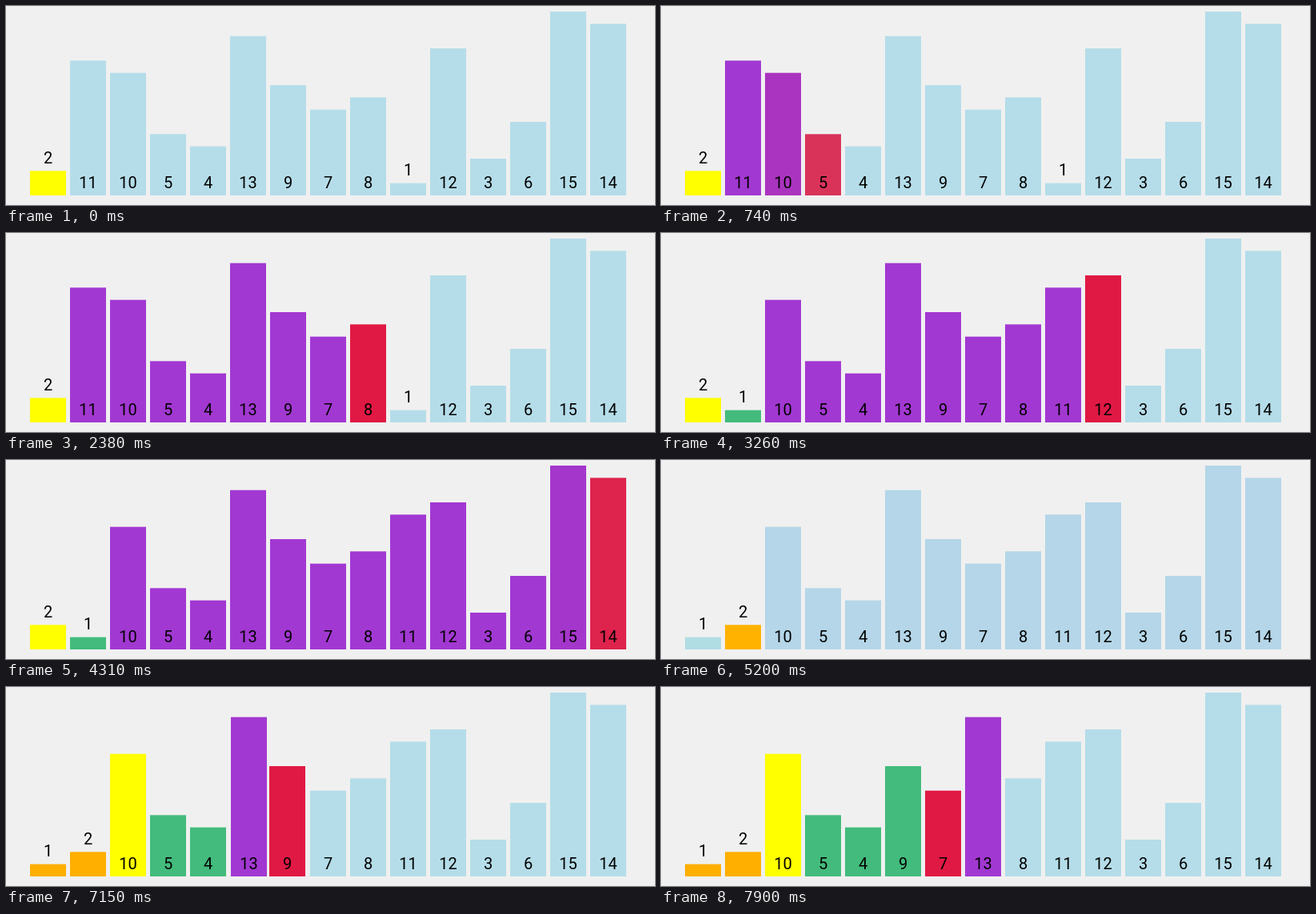
An HTML page that plays this animation: 811 by 249 pixels, repeating every 8 s.

```html
<!DOCTYPE html>
<html lang="en">
<head>
<meta charset="utf-8">
<title>Quick sort</title>
<style>
  html, body { margin: 0; width: 100%; height: 100%; overflow: hidden; background: #f0f0f0; }
  svg { display: block; width: 100%; height: 100%; }
  text { font: 20px Roboto, "Open Sans", sans-serif; text-anchor: middle; fill: #000; }
</style>
</head>
<body>
<svg id="stage" viewBox="0 0 811 249"></svg>
<script>
const LOOP = 8000, START = 13, STEP = 296, FADE = 200;
const LEFT = 30, PITCH = 50, WIDTH = 45, BASE = 237, UNIT = 230 / 15;
const BLUE = [181, 221, 233], RED = [224, 25, 68], PURPLE = [162, 56, 210],
      GREEN = [67, 187, 124], YELLOW = [255, 255, 0], ORANGE = [255, 175, 0];
const values = [2, 11, 10, 5, 4, 13, 9, 7, 8, 1, 12, 3, 6, 15, 14];

// Record one snapshot of all bars after every step of the sort.
const bars = values.map((value, slot) => ({ value, slot, color: slot ? BLUE : YELLOW }));
const states = [];
const at = slot => bars.find(b => b.slot === slot);
const paint = (slot, color) => { at(slot).color = color; };
const save = () => states.push(bars.map(b => ({ slot: b.slot, color: b.color })));

function swap(i, j) {
  const a = at(i), b = at(j);
  a.slot = j;
  b.slot = i;
  save();
}

function partition(first, last) {
  const pivot = at(first).value;
  let store = first;
  for (let i = first + 1; i <= last; i++) {
    paint(i, RED);
    save();
    if (at(i).value < pivot) {
      store++;
      if (store !== i) swap(store, i);
      paint(store, GREEN);
    } else {
      paint(i, PURPLE);
    }
  }
  return store;
}

save();
const mid = partition(0, 14);
save();
swap(0, mid);
bars.forEach(b => { b.color = BLUE; });
paint(mid, ORANGE);
save();
paint(0, ORANGE);
save();
paint(2, YELLOW);
save();
partition(2, 7);

const stage = document.getElementById("stage");
function add(tag, attrs) {
  const el = document.createElementNS("http://www.w3.org/2000/svg", tag);
  for (const name in attrs) el.setAttribute(name, attrs[name]);
  return stage.appendChild(el);
}

const views = values.map(v => {
  const top = BASE - v * UNIT;
  const rect = add("rect", { y: top, width: WIDTH, height: v * UNIT });
  const label = add("text", { y: v < 3 ? top - 9.8 : 228 });
  label.textContent = v;
  return { rect, label };
});
views.forEach(v => stage.appendChild(v.label));

const ease = p => p < 0.5 ? 4 * p ** 3 : 1 - 4 * (1 - p) ** 3;
const mix = (a, b, p) => a + (b - a) * p;

function draw(t) {
  const last = states.length - 1;
  const k = Math.min(Math.floor((t - START) / STEP), last - 1);
  const from = states[Math.max(k, 0)], to = states[k + 1];
  const p = ease(Math.min(Math.max((t - START - k * STEP) / FADE, 0), 1));
  views.forEach(({ rect, label }, i) => {
    const a = from[i], b = to[i];
    const x = LEFT + PITCH * mix(a.slot, b.slot, p);
    const rgb = a.color.map((c, n) => Math.round(mix(c, b.color[n], p)));
    rect.setAttribute("x", x);
    rect.setAttribute("fill", `rgb(${rgb})`);
    label.setAttribute("x", x + WIDTH / 2);
  });
}

const begin = performance.now();
function tick() {
  draw((performance.now() - begin) % LOOP);
  requestAnimationFrame(tick);
}
tick();
</script>
</body>
</html>
```
